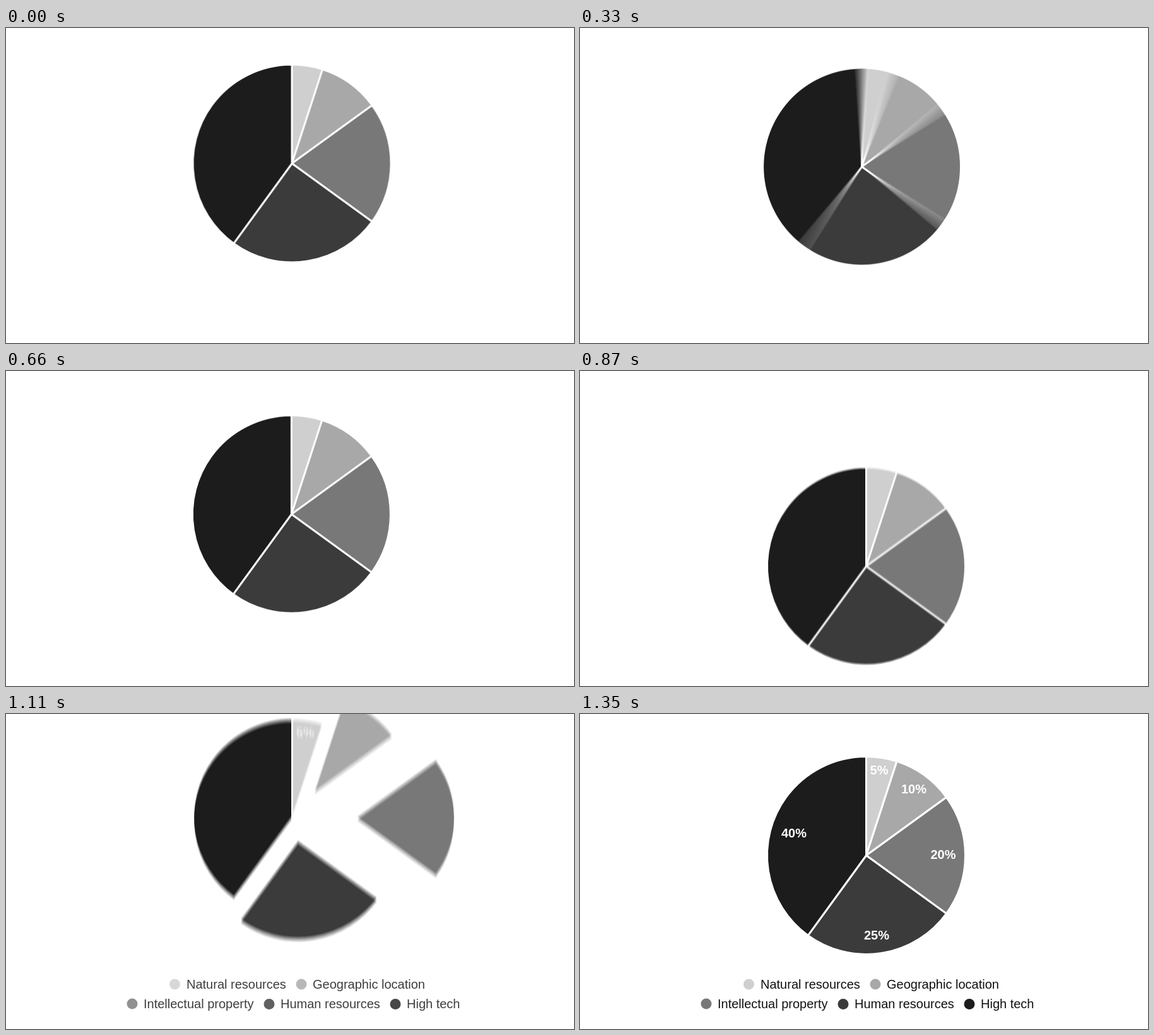
Recreate the animation shown at these times as an HTML page with a canvas. Size 900x500 px, loop 7.2 s.

```html
<!DOCTYPE html>
<html lang="en">
<head>
<meta charset="utf-8">
<title>Pie chart</title>
<style>
  html, body { margin: 0; width: 100%; height: 100%; overflow: hidden; background: #fff; }
  canvas { display: block; }
</style>
</head>
<body>
<canvas id="stage" width="900" height="500"></canvas>
<script>
const LOOP = 7200, STEP = 30, SETTLED = 1350, SHUTTER = 16, SAMPLES = 16;
const ORBIT_END = 650, RADIUS = 157, CENTER = { x: 453.5, y: 224.5 };
const FONT = '20px "Liberation Sans", Arial, sans-serif';
const RAD = Math.PI / 180;

// burst: furthest offset; label: text centre relative to the pie centre
const slices = [
  { share: 5,  color: '#cfcfcf', burst: [0, 0],    label: [20.5, -136], name: 'Natural resources',     dot: [267.5, 429], textX: 286 },
  { share: 10, color: '#a8a8a8', burst: [33, -38], label: [75.5, -106], name: 'Geographic location',   dot: [468, 429],   textX: 486 },
  { share: 20, color: '#787878', burst: [101, 0],  label: [122, -2],    name: 'Intellectual property', dot: [200, 460],   textX: 218 },
  { share: 25, color: '#3b3b3b', burst: [9, 36],   label: [16.5, 126],  name: 'Human resources',       dot: [417, 460.5], textX: 435 },
  { share: 40, color: '#1c1c1c', burst: [0, 0],    label: [-114.5, -36], name: 'High tech',            dot: [617, 460.5], textX: 635 }
];

const stage = document.getElementById('stage').getContext('2d');
const layer = document.createElement('canvas');
layer.width = 900;
layer.height = 500;
const ctx = layer.getContext('2d');

const ramp = (t, from, to) => Math.min(1, Math.max(0, (t - from) / (to - from)));
const ease = (t, from, to) => (1 - Math.cos(Math.PI * ramp(t, from, to))) / 2;

function center(t) {
  const angle = Math.min(t, ORBIT_END) * 0.84 * RAD;
  const orbit = { x: 453 + 6.5 * Math.sin(angle), y: 221 - 6 * Math.cos(angle) };
  if (t <= ORBIT_END) return orbit;
  return {
    x: orbit.x + (CENTER.x - orbit.x) * ease(t, ORBIT_END, 850),
    y: orbit.y + (315 - orbit.y) * ease(t, ORBIT_END, 910)
      - 165 * ease(t, 910, 1160)
      + (CENTER.y - 150) * ease(t, 1160, SETTLED)
  };
}

function drawPie(t, turn) {
  const { x, y } = center(t);
  const spread = ease(t, 890, 1110) - ease(t, 1110, SETTLED);
  let start = -Math.PI / 2;
  ctx.lineWidth = 3;
  ctx.lineJoin = 'miter';
  ctx.strokeStyle = '#fff';
  ctx.textAlign = 'center';
  ctx.font = 'bold ' + FONT;
  slices.forEach((slice, i) => {
    const end = start + slice.share / 100 * 2 * Math.PI;
    ctx.save();
    ctx.translate(x + slice.burst[0] * spread, y + slice.burst[1] * spread);
    ctx.rotate(turn);
    ctx.beginPath();
    ctx.moveTo(0, 0);
    ctx.arc(0, 0, RADIUS, start, end);
    ctx.closePath();
    ctx.fillStyle = slice.color;
    ctx.fill();
    ctx.stroke();
    ctx.globalAlpha = ramp(t, 1050 + i * 55, 1120 + i * 55);
    ctx.fillStyle = '#fff';
    ctx.fillText(slice.share + '%', slice.label[0], slice.label[1] + 7.5);
    ctx.restore();
    start = end;
  });
}

function drawLegend(t) {
  ctx.save();
  ctx.globalAlpha = ramp(t, 960, 1145);
  ctx.font = FONT;
  ctx.textAlign = 'left';
  for (const { color, name, dot, textX } of slices) {
    ctx.fillStyle = color;
    ctx.beginPath();
    ctx.arc(dot[0], dot[1], 8.5, 0, 2 * Math.PI);
    ctx.fill();
    ctx.fillStyle = '#111';
    ctx.fillText(name, textX, Math.floor(dot[1]) + 7);
  }
  ctx.restore();
}

// Averages several moments of one exposure into a motion blur.
function render(t) {
  const count = t < SETTLED ? SAMPLES : 1;
  const shake = 3.9 * RAD * (ramp(t, 0, 60) - ramp(t, 540, 630));
  for (let i = 0; i < count; i++) {
    const offset = count > 1 ? i / (count - 1) - 0.5 : 0;
    ctx.fillStyle = '#fff';
    ctx.fillRect(0, 0, 900, 500);
    drawPie(t + offset * SHUTTER, 2 * offset * shake);
    drawLegend(t);
    stage.globalAlpha = 1 / (i + 1);
    stage.drawImage(layer, 0, 0);
  }
}

let shown = -1;
function tick() {
  const elapsed = performance.now() % LOOP;
  const t = Math.min(SETTLED, Math.floor(elapsed / STEP) * STEP);
  if (t !== shown) render(shown = t);
  requestAnimationFrame(tick);
}
tick();
</script>
</body>
</html>
```
